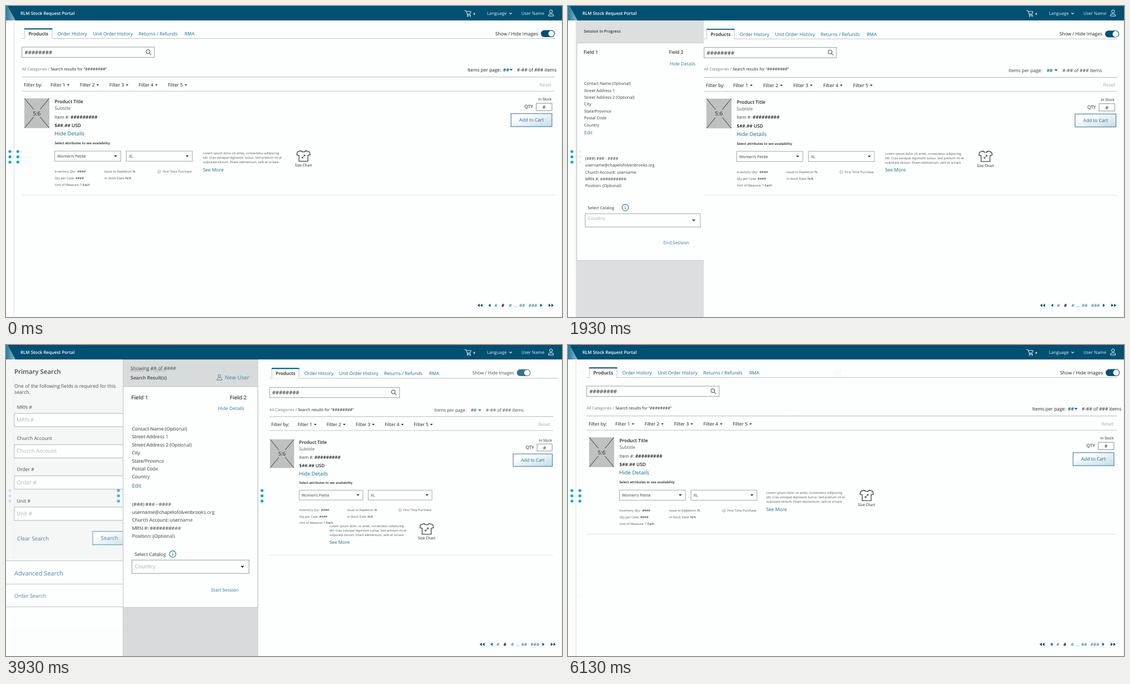
Animation of 1000 by 560 pixels, one loop 6.2 s. Source, as an HTML page:

```html
<!DOCTYPE html>
<html lang="en">
<head>
<meta charset="utf-8">
<title>Order portal</title>
<style>
  html, body { margin: 0; width: 100%; height: 100%; overflow: hidden; background: #fdfefe; }
  svg { display: block; width: 100vw; height: 100vh; }
  text { font-family: "Open Sans", "Noto Sans", sans-serif; text-rendering: geometricPrecision; white-space: pre; }
</style>
</head>
<body>
<svg id="stage" viewBox="0 0 1000 560">
  <defs>
    <linearGradient id="btn" x1="0" y1="0" x2="1" y2="1">
      <stop offset=".25" stop-color="#fdfefe"/><stop offset="1" stop-color="#c3dae6"/>
    </linearGradient>
    <linearGradient id="beam">
      <stop offset="0" stop-color="#2f7898"/><stop offset="1" stop-color="#8dbccf"/>
    </linearGradient>
  </defs>
</svg>
<script>
const svg = document.getElementById('stage');
const INK = '#1d1f20', LINK = '#1a6a8f', NAVY = '#005073', TEAL = '#0fa6ba', PAPER = '#fdfefe';

// ---------- drawing helpers ----------
function el(parent, tag, attrs = {}) {
  const node = document.createElementNS(svg.namespaceURI, tag);
  for (const k in attrs) node.setAttribute(k, attrs[k]);
  return parent.appendChild(node);
}
const group = parent => el(parent, 'g');
const rect = (p, x, y, width, height, fill, stroke = 'none', extra) =>
  el(p, 'rect', { x, y, width, height, fill, stroke, ...extra });
const line = (p, d, stroke = INK, width = 1) =>
  el(p, 'path', { d, fill: 'none', stroke, 'stroke-width': width });
const circle = (p, cx, cy, r, fill, stroke = 'none', width = 1) =>
  el(p, 'circle', { cx, cy, r, fill, stroke, 'stroke-width': width });

// y is the middle of the capitals
function text(p, x, y, size, str, { fill = INK, w = 400, anchor = 'start' } = {}) {
  const t = el(p, 'text', { x, y: y + size * .36, 'font-size': size, fill, 'font-weight': w, 'text-anchor': anchor });
  t.textContent = str;
  return t;
}
const caret = (p, x, y, w = 5, fill = INK) =>
  el(p, 'path', { d: `M${x - w / 2} ${y - w / 4}h${w}l${-w / 2} ${w / 2}z`, fill });
const arrow = (p, x, y, dir) =>
  el(p, 'path', { d: `M${x - dir * 2} ${y - 3}v6l${dir * 4} -3z`, fill: NAVY });
const chevron = (p, x, y, s, stroke, dir = 1) =>
  line(p, `M${x - s} ${y - dir * s / 2}l${s} ${dir * s}l${s} ${-dir * s}`, stroke, 1.1);

function button(p, x, y, w, h, str, size) {
  rect(p, x, y, w, h, 'url(#btn)', '#2d7191');
  text(p, x + w / 2, y + h / 2 - .2, size, str, { fill: LINK, anchor: 'middle' });
}
function info(p, x, y, r) {
  circle(p, x, y, r, 'none', '#1f7398', r / 5);
  line(p, `M${x} ${y - r * .15}v${r * .65}M${x} ${y - r * .5}v${r * .18}`, '#1f7398', r / 5);
}
function dots(p) {
  const g = group(p);
  [262, 271.5, 281].forEach(y => circle(g, 0, y, 2.6, TEAL));
  return g;
}

// ---------- left search panel ----------
const left = group(svg);
rect(left, 0, 26, 246, 362.5, '#f3f4f4');
rect(left, 0, 388.5, 246, 172, PAPER);
[388.5, 430.5, 471.5].forEach(y => line(left, `M0 ${y}H246`, '#b4b6b7'));
text(left, 15, 47.5, 11.4, 'Primary Search', { w: 600 });
text(left, 15, 73.5, 8.7, 'One of the following fields is required for this');
text(left, 15, 85, 8.7, 'search.');
['MRN #', 'Church Account', 'Order #', 'Unit #'].forEach((s, i) => {
  const y = 112 + i * 56.2;
  text(left, 19.5, y, 8.6, s);
  rect(left, 15, y + 11.2, 201, 24, PAPER, '#a2a4a5');
  text(left, 19, y + 22.6, 9.8, s, { fill: '#a3a5a6' });
});
text(left, 20, 348, 9.8, 'Clear Search', { fill: LINK });
button(left, 156, 335.7, 60, 24, 'Search', 9.8);
text(left, 15, 411.3, 11, 'Advanced Search', { fill: LINK });
text(left, 15, 451.5, 9.3, 'Order Search', { fill: LINK });
chevron(left, 228.5, 47.5, 3.6, INK, -1);
chevron(left, 228.5, 410.3, 3.6, INK);
chevron(left, 228.5, 451.3, 3.6, INK);

// ---------- middle session panel ----------
const edge = line(svg, 'M14.3 26V560', '#dddfdf');
const panel = group(svg);
const panelBack = rect(panel, 16, 26, 238, 540, '#d8dbdb', '#c6c8c9');
const panelBody = rect(panel, 16, 66, 238, 392, PAPER, '#bfc1c2');
const pairs = [], slides = [];

// the same line in the narrow and the wide layout
function pair(xb, yb, sb, xc, yc, sc, str, o, strC = str) {
  const g = group(panel);
  pairs.push({ g, b: text(g, 0, 0, sb, str, o), c: text(g, 0, 0, sc, strC, o) });
  slides.push({ g, b: [xb, yb], c: [xc, yc] });
}
function slide(b, c) {
  const g = group(panel);
  slides.push({ g, b, c });
  return g;
}
const onlyB = slide([0, 0], [245, 0]);
text(onlyB, 28.5, 45.5, 7.2, 'Session in Progress', { w: 600 });
const onlyC = slide([-245, 0], [0, 0]);
text(onlyC, 274.5, 42, 8.6, 'Showing ## of ####');
text(onlyC, 274.5, 59, 8.5, 'Search Result(s)', { w: 600 });
circle(onlyC, 434.5, 55.7, 2.4, 'none', LINK);
line(onlyC, 'M430 63.2c0 -6 9 -6 9 0z', LINK);
text(onlyC, 444, 58.6, 9.8, 'New User', { fill: LINK });

pair(28, 83, 8.3, 276.5, 97, 9.7, 'Field 1', { w: 600 });
pair(181.5, 83, 8.3, 460, 97, 9.7, 'Field 2', { w: 600 });
pair(183, 104, 8.3, 433, 116, 8.4, 'Hide Details', { fill: LINK });
['Contact Name (Optional)', 'Street Address 1', 'Street Address 2 (Optional)', 'City',
 'State/Province', 'Postal Code', 'Country'].forEach((s, i) =>
  pair(29, 139.6 + i * 12.4, 7.25, 277.7, 154 + i * 14.85, 8.65, s));
pair(29, 228, 8.4, 277.7, 259.5, 9.8, 'Edit', { fill: LINK });
['(###) ### - ####', 'username@chapelofolvenbrooks.org', 'Church Account: username',
 'MRN #: ##########', 'Position: (Optional)'].forEach((s, i) =>
  pair(31, 274.2 + i * 12.35, 7.25, 277.7, 290 + i * 14.8, 8.65, s));
pair(35.5, 363, 7.3, 282, 380, 8.7, 'Select Catalog');
info(slide([103, 363], [351, 380]), 0, 0, 5.8);
const selectBox = rect(slide([31, 374], [277.3, 390.7]), 0, 0, 207, 24, PAPER, '#96999a');
caret(slide([226, 386], [477, 403]), 0, 0, 6.5);
pair(35.5, 381.5, 8.4, 282.5, 402.5, 10, 'Country', { fill: '#a3a5a6' });
pair(171.5, 426, 8.25, 420, 444.5, 8.3, 'End Session', { fill: LINK }, 'Start Session');

// ---------- drag handles ----------
const handles = { edge: dots(svg), second: dots(svg), search: dots(svg), session: dots(svg) };

// ---------- products ----------
const products = group(svg);
const backdrop = rect(products, 24, 26, 980, 540, PAPER);
const movers = [];
// b and c are [x, y, scale] for the half open and open layouts
function mover(b, c) {
  const g = group(products);
  movers.push({ g, b, c });
  return g;
}
const rules = [
  { y: [58.5, 59.4, 60], right: [987, 988, 994], stroke: '#c2c4c5' },
  { y: [127.8, 128.5, 129], right: [987, 988, 983], stroke: '#b3b5b6' },
  { y: [153.3, 153.8, 154], right: [987, 988, 983], stroke: '#c2c4c5' },
  { y: [340.3, 340.8, 388.5], right: [987, 988, 983], stroke: '#dfe1e1' }
].map(r => ({ ...r, node: line(products, '', r.stroke) }));

const tabs = mover([245.2, .8, 1], [497.4, 2, .98]);
rect(tabs, 33.5, 41, 49.5, 18.4, PAPER);
line(tabs, 'M33.4 58.7V41H83V58.7', '#c2c4c5');
line(tabs, 'M33 41.2H83.4', NAVY, 1.9);
text(tabs, 40.4, 50, 8.4, 'Products', { w: 600 });
[[92.7, 'Order History'], [156.4, 'Unit Order History'], [238.4, 'Returns / Refunds'], [321, 'RMA']]
  .forEach(([x, s]) => text(tabs, x, 50, 8.4, s, { fill: LINK }));

const search = mover([245, .7, 1], [498.1, 4.6, .977]);
rect(search, 28.8, 74, 238, 18.6, PAPER, '#9b9e9f');
text(search, 33.5, 83.5, 9.6, '########');
circle(search, 255.4, 82.2, 3.5, 'none', INK, .9);
line(search, 'M258 84.8l3.4 3.4', INK, 1);

const crumbs = mover([245, .7, 1], [497.8, 5.6, .99]);
text(crumbs, 28.5, 113, 7.1, 'All Categories / ', { fill: '#76797a' });
text(crumbs, 80.2, 113, 7.1, 'Search results for “########”');

const filters = mover([244.2, -2.8, 1.024], [497.6, 3.8, .98]);
text(filters, 32, 142, 8.35, 'Filter by:');
for (let i = 0; i < 5; i++) {
  const x = 80 + i * 52.85;
  text(filters, x, 142, 8.4, 'Filter ' + (i + 1));
  caret(filters, x + 32, 142.4, 4.8);
}
text(mover([3.5, .4, 1], [-3.5, 1, 1]), 959.5, 142, 8.4, 'Reset', { fill: '#aaacad' });

const item = mover([245, .6, 1], [494.4, 11.8, .955]);
rect(item, 33, 166.3, 45, 53.5, '#bfc0c0');
line(item, 'M33.5 166.5L49.5 186M77.5 166.5L61.5 186M33.5 219.5L49.5 200M77.5 219.5L61.5 200', INK, .9);
text(item, 55.5, 193, 9.8, '5:6', { anchor: 'middle' });
text(item, 87.5, 172, 8.4, 'Product Title', { w: 600 });
text(item, 87.5, 184.3, 8.1, 'Subtitle', { fill: '#55585a' });
text(item, 87.5, 199.6, 8.1, 'Item #:', { fill: '#3c3f40' });
text(item, 116, 199.6, 8.4, '#########', { w: 600 });
text(item, 87.5, 215, 8.3, '$##.## USD', { w: 600 });
text(item, 87.3, 230, 9.6, 'Hide Details', { fill: LINK });
text(item, 87.5, 247, 6, 'Select attributes to see availability', { w: 600 });
[[87.5, 'Women’s Petite'], [216.3, 'XL']].forEach(([x, s]) => {
  rect(item, x, 261.2, 118.8, 18.4, PAPER, '#9b9e9f', { 'stroke-width': .9 });
  text(item, x + 4.6, 270.5, 7.2, s, { fill: '#3c3f40' });
  caret(item, x + 109.6, 270.4, 5.6);
});
[[87.5, 298.3, 'Inventory Qty:', 128.5, '####'], [87.5, 310.3, 'Qty per Case:', 125, '####'],
 [87.5, 322.3, 'Unit of Measure:', 133.3, '1 Each'], [177, 298.3, 'Issue to Depletion:', 228, 'N'],
 [177, 310.3, 'In Stock Date:', 215, 'N/A']].forEach(([x, y, s, vx, v]) => {
  text(item, x, y, 5.75, s, { fill: '#56595a' });
  text(item, vx, y, 5.75, v, { w: 500 });
});
info(item, 275.5, 298.3, 2.6);
text(item, 281.7, 298.3, 5.75, 'First Time Purchase', { fill: '#56595a' });

const blurb = mover([245, .6, 1], [233.6, 84.5, .97]);
['Lorem ipsum dolor sit amet, consectetur adipiscing', 'elit. Cras volutpat dignissim luctus. Sed pretium mi at',
 'vulputate dictum. Etiam elementum, velit et ornare'].forEach((s, i) =>
  text(blurb, 354.2, 265.2 + i * 8, 5.75, s, { fill: '#56595a' }));
text(blurb, 354.2, 294.7, 8.5, 'See More', { fill: LINK });

const chart = mover([245, .6, 1], [204.8, 71.4, 1.02]);
line(chart, 'M530.5 260.5L524 263L523 268L527 269V279.5H543V269L547 268L546 263L539.5 260.5C538.5 263.5 531.5 263.5 530.5 260.5Z', INK, 1.1);
line(chart, 'M532.3 273.7L537.7 268.3M535.2 268.3h2.5v2.5M534.8 273.7h-2.5v-2.5', INK, .9);
text(chart, 535, 286.6, 6.65, 'Size Chart', { anchor: 'middle' });

const qty = mover([1.6, .7, 1], [49.1, 12.4, .95]);
text(qty, 957.3, 168, 6.6, 'In Stock');
text(qty, 932.5, 181.3, 8.3, 'QTY');
rect(qty, 953.7, 175.2, 28.2, 13.2, PAPER, '#8d9091');
text(qty, 967.8, 182, 8.3, '#', { anchor: 'middle' });
button(mover([4.2, .7, 1], [49.1, 12.4, .95]), 908.3, 193.8, 73.6, 23.4, 'Add to Cart', 8.4);

const pages = mover([1.2, 0, 1], [4.5, 0, 1]);
[[850, -1], [855, -1], [869.5, -1], [962.8, 1], [978, 1], [983, 1]].forEach(([x, d]) => arrow(pages, x, 539, d));
[[878.4, '#'], [891, '#', 1], [904.5, '#'], [913.3, '...'], [923, '##'], [939.8, '###']].forEach(([x, s, on]) =>
  text(pages, x, 539.2, 8.1, s, on ? { w: 700 } : { fill: LINK }));

// controls that ride with the sliding sheet and cross-fade
function toggle() {
  const g = group(products);
  text(g, 0, 0, 8.4, 'Show / Hide Images');
  rect(g, 82, -6.1, 25.2, 12.4, NAVY, 'none', { rx: 6.2 });
  circle(g, 100.8, .1, 5.3, PAPER);
  return g;
}
function perPage(gap) {
  const g = group(products);
  text(g, 0, 0, 8.35, 'Items per page:');
  text(g, 64 + gap * 1.5, 0, 8.4, '##', { fill: LINK, w: 700 });
  caret(g, 78.5 + gap * 2.3, 0, 6.2, NAVY);
  text(g, 89 + gap * 2.6, 0, 8.4, '#-## of ### items');
  return g;
}
const toggleAB = toggle(), toggleC = toggle();
const perPages = [[perPage(0), 830, 115, 1], [perPage(3), 822, 115.6, 1], [perPage(3), 821.5, 117.5, .957]];

// ---------- header ----------
const head = group(svg);
rect(head, 0, 0, 1000, 26, NAVY);
el(head, 'path', { d: 'M0 0H3L17 26H0Z', fill: 'url(#beam)' });
text(head, 26, 12.7, 7.9, 'RLM Stock Request Portal', { fill: '#fff', w: 600 });
line(head, 'M824.5 8.2h2.6l3 8h5.6M827.8 10h8.6l-1.6 4.4h-5.4', '#fff', .9);
circle(head, 830.4, 18, 1, 'none', '#fff', .8);
circle(head, 834.8, 18, 1, 'none', '#fff', .8);
text(head, 840.6, 14, 5.2, '#', { fill: '#fff', w: 700 });
text(head, 865, 12.8, 7.9, 'Language', { fill: '#e3eef3' });
chevron(head, 907.6, 13.2, 2.3, '#e3eef3');
text(head, 927, 12.8, 7.85, 'User Name', { fill: '#e3eef3' });
circle(head, 980.2, 9.8, 2.6, 'none', '#fff');
line(head, 'M975.8 18v-1.2a2.6 2.6 0 0 1 2.6 -2.6h3.6a2.6 2.6 0 0 1 2.6 2.6v1.2z', '#fff');
line(svg, 'M999.6 26V560', '#e6e8e8', .8);

// ---------- motion ----------
const LOOP = 6200, DUR = 540, STARTS = [1545, 3602, 5632];
const SHEET = [24, 274, 522];
const mix = (a, b, k) => a + (b - a) * k;
const move = (g, x, y, s = 1) => g.setAttribute('transform', `translate(${x} ${y}) scale(${s})`);
const fade = (g, o) => g.setAttribute('opacity', o);
const set = (node, attrs) => { for (const k in attrs) node.setAttribute(k, attrs[k]); };

// cubic-bezier(0, 0, .58, 1)
function easeOut(x) {
  if (x <= 0 || x >= 1) return x <= 0 ? 0 : 1;
  let lo = 0, hi = 1;
  for (let i = 0; i < 24; i++) {
    const s = (lo + hi) / 2;
    if (s * s * (1.74 - .74 * s) < x) lo = s; else hi = s;
  }
  return lo * lo * (3 - 2 * lo);
}

function draw(t) {
  // weights of the closed, half open and open layouts
  const [p, q, r] = STARTS.map(s => easeOut((t - s) / DUR));
  const w = [1 - p + r, p - q, q - r];
  const blend = v => v[0] * w[0] + v[1] * w[1] + v[2] * w[2];
  const k = q, sheet = blend(SHEET);

  fade(left, w[2]);
  fade(edge, w[0] + w[1]);
  fade(panel, w[1] + w[2]);
  const x = mix(16, 261.3, k), width = mix(238, 243.2, k), top = mix(66.5, 77, k);
  set(panelBack, { x, width });
  set(panelBody, { x, width, y: top, height: mix(458, 476.5, k) - top });
  set(selectBox, { width: mix(207, 211.5, k) });
  slides.forEach(s => move(s.g, mix(s.b[0], s.c[0], k), mix(s.b[1], s.c[1], k)));
  pairs.forEach(s => { fade(s.b, 1 - k); fade(s.c, k); });
  fade(onlyB, 1 - k);
  fade(onlyC, k);

  move(handles.edge, 7, 0);
  fade(handles.edge, w[0] + w[1]);
  move(handles.second, 21.3, 0);
  fade(handles.second, w[0]);
  move(handles.search, mix(7, 253, k), 0);
  fade(handles.search, w[2]);
  move(handles.session, mix(261, 512.3, k), 0);
  fade(handles.session, w[1] + w[2]);

  set(backdrop, { x: sheet });
  movers.forEach(({ g, b, c }) =>
    move(g, blend([0, b[0], c[0]]), blend([0, b[1], c[1]]), blend([1, b[2], c[2]])));
  const from = blend([28.5, 273.5, 526]);
  rules.forEach(l => set(l.node, { d: `M${from} ${blend(l.y)}H${blend(l.right)}` }));

  const home = r > 0 ? 0 : p;
  const ride = q > 0 ? sheet - (r > 0 ? SHEET[0] : SHEET[1]) : 0;
  move(toggleAB, mix(880, 884.5, home) + ride, mix(49.7, 50.4, home));
  fade(toggleAB, w[0] + w[1]);
  move(toggleC, 890 + sheet - SHEET[2], 49.8, .975);
  fade(toggleC, w[2]);
  perPages.forEach(([g, px, py, s], i) => {
    move(g, px + sheet - SHEET[i], py, s);
    fade(g, w[i]);
  });
}

const t0 = performance.now();
function tick() {
  draw((performance.now() - t0) % LOOP);
  requestAnimationFrame(tick);
}
tick();
</script>
</body>
</html>
```
